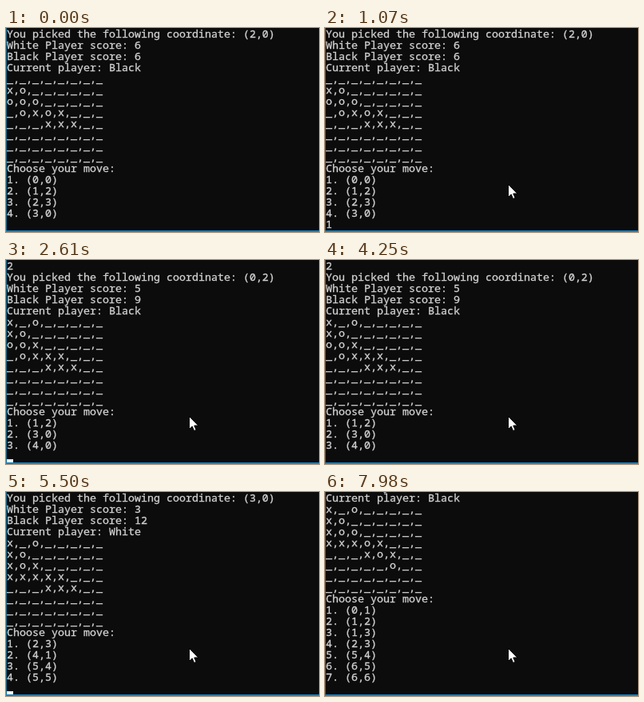
An HTML page with a canvas that plays this animation: 392x255 px, repeating every 8 s.

```html
<!DOCTYPE html>
<html lang="en">
<head>
<meta charset="utf-8">
<title>Console board game</title>
<style>
  html, body { margin: 0; width: 100%; height: 100%; overflow: hidden; background: #0c0c0c; }
  canvas { display: block; }
</style>
</head>
<body>
<canvas id="stage" width="392" height="255"></canvas>
<script>
const LOOP = 8000, CELL_W = 8, LINE_H = 14, ROWS = 18, LEFT = 1, BASELINE = 12;
const ctx = document.getElementById('stage').getContext('2d');

// Console output for one turn; short board rows are padded with empty cells.
function turn(pick, white, black, player, board, moves, typed = '') {
  const boardLines = Array.from({ length: 8 }, (_, i) =>
    [...(board[i] || '').padEnd(8, '_')].join(','));
  return [
    typed,
    `You picked the following coordinate: (${pick})`,
    `White Player score: ${white}`,
    `Black Player score: ${black}`,
    `Current player: ${player}`,
    ...boardLines,
    'Choose your move:',
    ...moves.split(' ').map((move, i) => `${i + 1}. (${move})`)
  ];
}

const turns = [
  turn('2,0', 6, 6, 'Black', ['', 'xo', 'ooo', '_oxox', '___xxx'],
    '0,0 1,2 2,3 3,0'),
  turn('0,0', 3, 10, 'White', ['x', 'xx', 'oox', '_oxxx', '___xxx'],
    '0,1 0,2 1,3 2,3 3,5 5,4', '1'),
  turn('0,2', 5, 9, 'Black', ['x_o', 'xo', 'oox', '_oxxx', '___xxx'],
    '1,2 3,0 4,0', '2'),
  turn('3,0', 3, 12, 'White', ['x_o', 'xo', 'xox', 'xxxxx', '___xxx'],
    '2,3 4,1 5,4 5,5', '2'),
  turn('5,5', 7, 9, 'Black', ['x_o', 'xo', 'xoo', 'xxxox', '___xox', '_____o'],
    '0,1 1,2 1,3 2,3 5,4 6,5 6,6', '4')
];

// [start ms, turn, typed input, caret visible]
const timeline = [
  [0, 0, '', false], [1070, 0, '1', false],
  [1370, 1, '', true], [2150, 1, '', false], [2230, 1, '2', true],
  [2610, 2, '', true], [3240, 2, '', false], [3700, 2, '', true],
  [4250, 2, '', false], [4320, 2, '2', true], [4780, 2, '2', false],
  [4950, 2, '', true], [5100, 2, '2', true], [5330, 2, '2', false],
  [5500, 3, '', true], [6350, 3, '', false], [6660, 3, '4', true], [6890, 3, '4', false],
  [7120, 4, '', true], [7980, 4, '', false]
];

const arrow = new Path2D('M.5 .5V16.5L4.2 13L6.6 18.5L9.2 17.4L6.8 12H11.8Z');

function rect(color, x, y, w, h) {
  ctx.fillStyle = color;
  ctx.fillRect(x, y, w, h);
}

function drawConsole(t) {
  const [, turnIndex, input, caret] = timeline.findLast(([start]) => start <= t);
  const lines = [...turns[turnIndex], input];
  const firstRow = ROWS - lines.length;
  ctx.font = '13.3333px "Noto Sans Mono", "DejaVu Sans Mono", monospace';
  ctx.fillStyle = ctx.strokeStyle = '#d2d2d2';
  ctx.lineWidth = 0.3;
  lines.forEach((line, i) => {
    const y = BASELINE + (firstRow + i) * LINE_H;
    ctx.fillText(line, LEFT, y);
    ctx.strokeText(line, LEFT, y); // slightly heavier strokes
  });
  if (caret) rect('#f2f2f2', LEFT + input.length * CELL_W, 249, CELL_W, 4);
}

// The pointer glides in from the lower right and then rests.
function drawPointer(t) {
  if (t < 130) return;
  const step = Math.min(9, Math.floor((t - 130) / 77.5) + 1);
  const away = (1 - step / 9) ** 2;
  ctx.save();
  ctx.translate(Math.round(229 + 100 * away), Math.round(195 + 70 * away));
  ctx.fillStyle = '#fff';
  ctx.strokeStyle = '#000';
  ctx.lineWidth = 1;
  ctx.fill(arrow);
  ctx.stroke(arrow);
  ctx.restore();
}

function draw(t) {
  rect('#0c0c0c', 0, 0, 392, 255);
  drawConsole(t);
  rect('#14698c', 0, 0, 1, 255);
  rect('#1182c3', 0, 253, 392, 2);
  drawPointer(t);
}

const begin = performance.now();
function frame() {
  draw((performance.now() - begin) % LOOP);
  requestAnimationFrame(frame);
}
frame();
</script>
</body>
</html>
```
